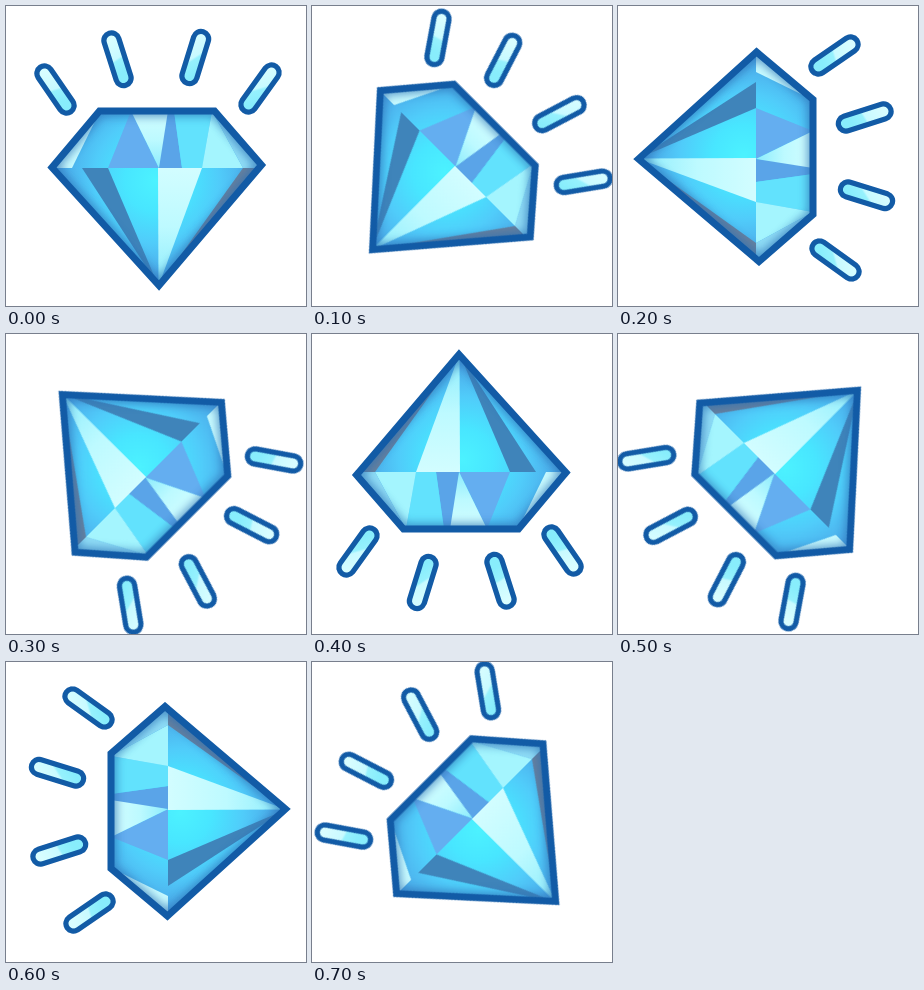
Write an HTML page that moves like this. It is 300x300 px and loops after 0.8 s.

```html
<!DOCTYPE html>
<html lang="en">
<head>
<meta charset="utf-8">
<title>Spinning diamond</title>
<style>
  html, body { margin: 0; width: 100%; height: 100%; overflow: hidden; background: #fff; }
  svg { display: block; width: 100vw; height: 100vh; }
  #gem {
    transform-origin: 150px 150px;
    animation: turn 800ms steps(8, end) infinite;
  }
  @keyframes turn {
    from { transform: rotate(0deg); }
    to { transform: rotate(360deg); }
  }
  line { stroke-linecap: round; }
</style>
</head>
<body>
<svg viewBox="0 0 300 300">
  <defs>
    <linearGradient id="pale" x1="0" y1="0" x2="0" y2="1">
      <stop offset="0" stop-color="#d2fdff"/><stop offset=".5" stop-color="#bdfaff"/><stop offset="1" stop-color="#8cecfc"/>
    </linearGradient>
    <radialGradient id="cyan" gradientUnits="userSpaceOnUse" cx="150" cy="174" r="105">
      <stop offset="0" stop-color="#4cf2ff"/><stop offset=".3" stop-color="#48e6ff"/>
      <stop offset=".6" stop-color="#50ccfa"/><stop offset="1" stop-color="#4ba0e4"/>
    </radialGradient>
    <linearGradient id="glow" x1="0" y1="0" x2=".2" y2="1">
      <stop offset="0" stop-color="#d8fdff"/><stop offset=".55" stop-color="#c8faff"/>
      <stop offset=".62" stop-color="#96f1fd"/><stop offset="1" stop-color="#88edfc"/>
    </linearGradient>
    <filter id="soft" x="-20%" y="-20%" width="140%" height="140%">
      <feGaussianBlur stdDeviation="4"/>
    </filter>
    <path id="edge" d="M93.5 105H208.5L255.5 159 153 279.5 46 161.5Z"/>
    <clipPath id="inside"><use href="#edge"/></clipPath>
    <g id="rays">
      <line x1="38.5" y1="67.5" x2="60.5" y2="99.5"/>
      <line x1="105.5" y1="34.5" x2="117.5" y2="72"/>
      <line x1="195" y1="33" x2="183.5" y2="70"/>
      <line x1="265.5" y1="66.5" x2="242.5" y2="98.5"/>
    </g>
  </defs>

  <g id="gem">
    <g clip-path="url(#inside)">
      <use href="#edge" fill="url(#cyan)"/>
      <!-- crown -->
      <path fill="#c8fbff" d="M46 162 94 105 66 162Z"/>
      <path fill="#64aef0" d="M125 105 153 162H102Z"/>
      <path fill="url(#pale)" d="M125 105H167L153 162Z"/>
      <path fill="#5aa4e8" d="M162 105H168L176 162H153Z"/>
      <path fill="#62e2fd" d="M168 105H206L196 162H176Z"/>
      <path fill="#a4f5fe" d="M206 105 237 162H196Z"/>
      <path fill="#8fdcf6" d="M206 105H210L257 162H237Z"/>
      <!-- pavilion -->
      <path fill="#3f84ba" d="M76 162H102L152.5 280Z"/>
      <path fill="url(#pale)" d="M152 162H196L152.5 280Z"/>
      <path fill="#66809e" d="M237 162H257L152.5 280Z"/>
      <use href="#edge" fill="none" stroke="#2a6fb4" stroke-width="12" opacity=".65" filter="url(#soft)"/>
    </g>
    <use href="#edge" fill="none" stroke="#125ba6" stroke-width="7"/>
    <use href="#rays" stroke="#125ba6" stroke-width="20.5"/>
    <use href="#rays" stroke="url(#glow)" stroke-width="10"/>
  </g>
</svg>
</body>
</html>
```
